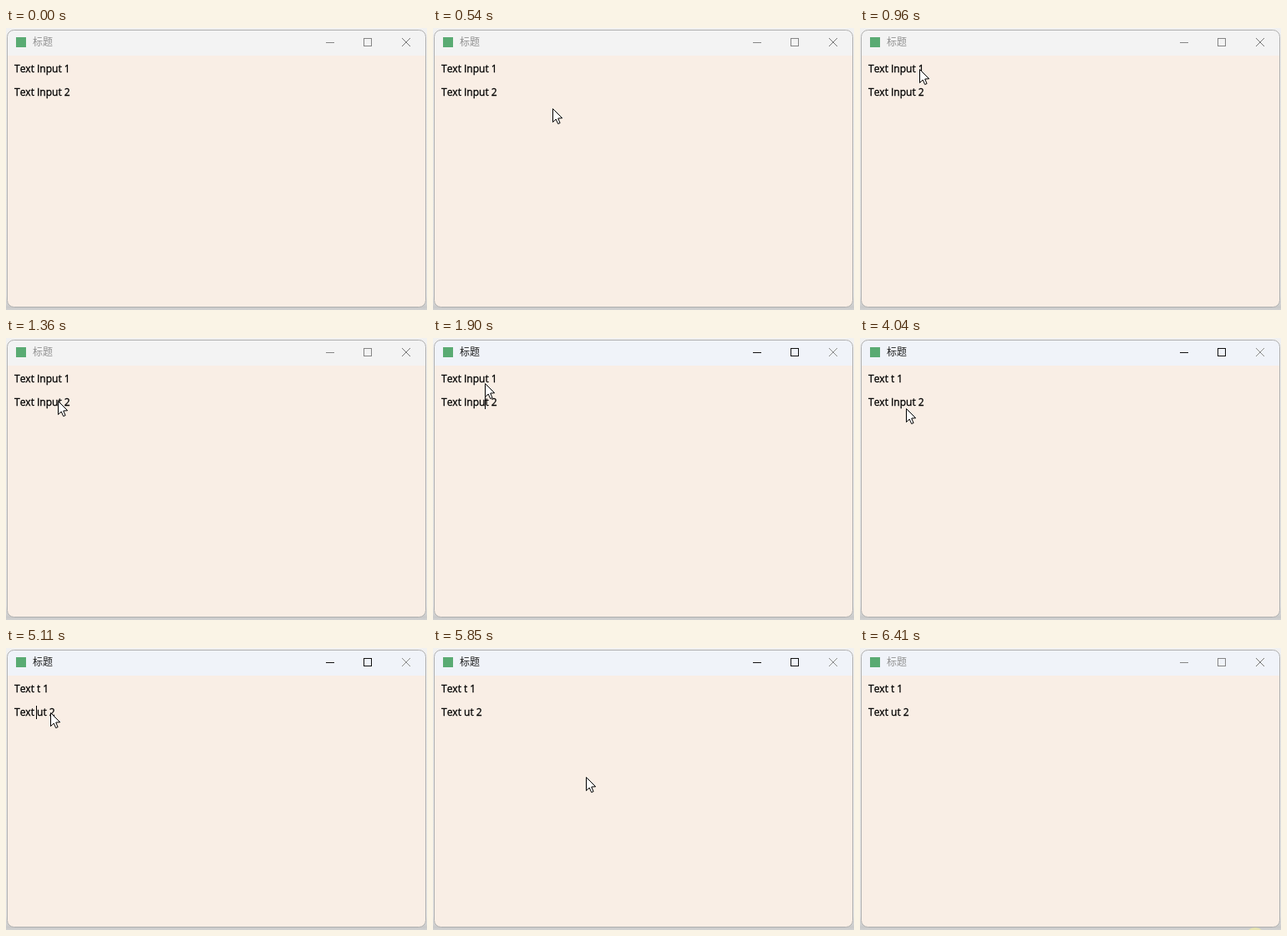
Animation, 504 px wide and 337 px high, one loop 6480 ms. Source, as an HTML page with a canvas:

```html
<!DOCTYPE html>
<html lang="zh-CN">
<head>
<meta charset="utf-8">
<style>
html, body { margin: 0; width: 100%; height: 100%; overflow: hidden; background: #eee; }
canvas { display: block; }
</style>
</head>
<body>
<canvas id="stage" width="504" height="337"></canvas>
<script>
const ctx = document.getElementById('stage').getContext('2d', { alpha: false });
const LOOP = 6480, STEP = 67, BLINK = 540, HIGHLIGHT = 100;
const ACTIVATE = 1430, DEACTIVATE = 6410, POINTER_LEAVES = 6190;
const FONT = '12px "Open Sans", sans-serif';
const TITLE_FONT = '12px "Noto Sans CJK SC", "Noto Sans CJK", sans-serif';

const smooth = u => u * u * (3 - 2 * u);
const glide = u => 1 - Math.exp(-4.5 * u);

// Pointer moves; between them the pointer rests
const moves = [
  { start: 210, end: 960, from: [428, 285], to: [71, 49], ease: glide },
  { start: 960, end: 1290, from: [71, 49], to: [62, 75], ease: smooth },
  { start: 1560, end: 1830, from: [62, 75], to: [62, 54], ease: smooth },
  { start: 3710, end: 3900, from: [62, 54], to: [57, 91], ease: smooth },
  { start: 3900, end: 4180, from: [57, 91], to: [53, 77], ease: smooth },
  { start: 5640, end: 6190, from: [53, 77], to: [482, 330], ease: smooth }
];

const fields = [{ text: 'Text Input 1', y: 41 }, { text: 'Text Input 2', y: 69 }];

// Each session begins with a click that places the caret; each cut is one backspace
const sessions = [
  { start: ACTIVATE, field: fields[1], caret: 9, cuts: [] },
  { start: 1970, field: fields[0], caret: 9, cuts: [2770, 2900, 3030, 3180] },
  { start: 4250, field: fields[1], caret: 8, cuts: [4780, 4980, 5110] }
];

const latest = (list, t) => list.filter(item => item.start <= t).pop();

function pointerAt(t) {
  const move = latest(moves, t);
  if (!move || t >= POINTER_LEAVES) return null;
  const elapsed = Math.floor((t - move.start) / STEP) * STEP;
  const u = t >= move.end ? 1 : elapsed / (move.end - move.start);
  const p = u === 1 ? 1 : move.ease(u);
  return move.from.map((v, i) => Math.round(v + (move.to[i] - v) * p));
}

function line(color, x1, y1, x2, y2) {
  ctx.strokeStyle = color;
  ctx.beginPath();
  ctx.moveTo(x1, y1);
  ctx.lineTo(x2, y2);
  ctx.stroke();
}

function drawWindow(t) {
  const active = t >= ACTIVATE && t < DEACTIVATE;
  const ink = active ? '#111' : '#858585';
  const shadow = ctx.createLinearGradient(0, 0, 0, 337);
  shadow.addColorStop(0, '#f1f1f1');
  shadow.addColorStop(0.95, '#e4e4e4');
  shadow.addColorStop(0.99, '#cacaca');
  shadow.addColorStop(1, '#d2d2d2');
  ctx.fillStyle = shadow;
  ctx.fillRect(0, 0, 504, 337);

  ctx.lineWidth = 1;
  ctx.save();
  ctx.beginPath();
  ctx.roundRect(1.5, 2.5, 501, 331, 8);
  ctx.clip();
  ctx.fillStyle = '#f9eee5';
  ctx.fillRect(0, 0, 504, 337);
  ctx.fillStyle = t < ACTIVATE ? '#f3f3f3' : '#f0f3f9';
  ctx.fillRect(0, 0, 504, 33);
  ctx.restore();
  ctx.strokeStyle = '#b0b0b0';
  ctx.stroke();

  ctx.fillStyle = '#5aab73';
  ctx.fillRect(12, 11, 12, 12);
  ctx.font = TITLE_FONT;
  ctx.fillStyle = active ? '#1c1c1c' : '#909090';
  ctx.fillText('标题', 32, 21);

  line(ink, 383, 17.5, 393, 17.5);
  ctx.strokeRect(428.5, 12.5, 9, 9);
  const cross = active ? '#8c8c8c' : '#777';
  line(cross, 474, 12, 484, 22);
  line(cross, 484, 12, 474, 22);
}

function drawTexts(t) {
  ctx.font = FONT;
  ctx.fontKerning = 'none';
  ctx.fillStyle = ctx.strokeStyle = '#000';
  ctx.lineWidth = 0.3;
  const current = latest(sessions, t);

  for (const field of fields) {
    let text = field.text;
    for (const session of sessions.filter(s => s.field === field)) {
      const done = session.cuts.filter(cut => cut <= t).length;
      text = text.slice(0, session.caret - done) + text.slice(session.caret);
    }
    ctx.fillText(text, 10, field.y + 12);
    ctx.strokeText(text, 10, field.y + 12);
    if (current && current.field === field && t < DEACTIVATE) drawCaret(current, text, t);
  }
}

function drawCaret({ start, field, caret, cuts }, text, t) {
  const done = cuts.filter(cut => cut <= t);
  const lastInput = Math.max(start, ...done);
  if (Math.floor((t - lastInput) / BLINK) % 2) return;
  const head = text.slice(0, caret - done.length);
  ctx.fillRect(Math.round(9.45 + ctx.measureText(head).width), field.y, 1, 16);
}

function drawClick(start, t, [x, y]) {
  if (t < start || t >= start + HIGHLIGHT) return;
  ctx.fillStyle = 'rgba(255, 250, 150, 0.5)';
  ctx.beginPath();
  ctx.arc(x, y, 12, 0, Math.PI * 2);
  ctx.fill();
}

function drawPointer([x, y]) {
  const arrow = [[0, 0], [0, 16], [3.7, 12.5], [6.2, 18], [8.6, 17], [6.2, 11.5], [11.2, 11.2]];
  ctx.beginPath();
  arrow.forEach(([dx, dy]) => ctx.lineTo(x + dx + 0.5, y + dy + 0.5));
  ctx.closePath();
  ctx.fillStyle = '#fff';
  ctx.fill();
  ctx.strokeStyle = '#000';
  ctx.lineWidth = 1;
  ctx.stroke();
}

function render(t) {
  const pointer = pointerAt(t);
  drawWindow(t);
  drawTexts(t);
  if (pointer) {
    sessions.forEach(session => drawClick(session.start, t, pointer));
    drawPointer(pointer);
  }
  // A click elsewhere, just below the stage, takes the focus away
  drawClick(DEACTIVATE, t, [473, 346]);
}

const start = performance.now();
function tick() {
  render((performance.now() - start) % LOOP);
  requestAnimationFrame(tick);
}
tick();
</script>
</body>
</html>
```
